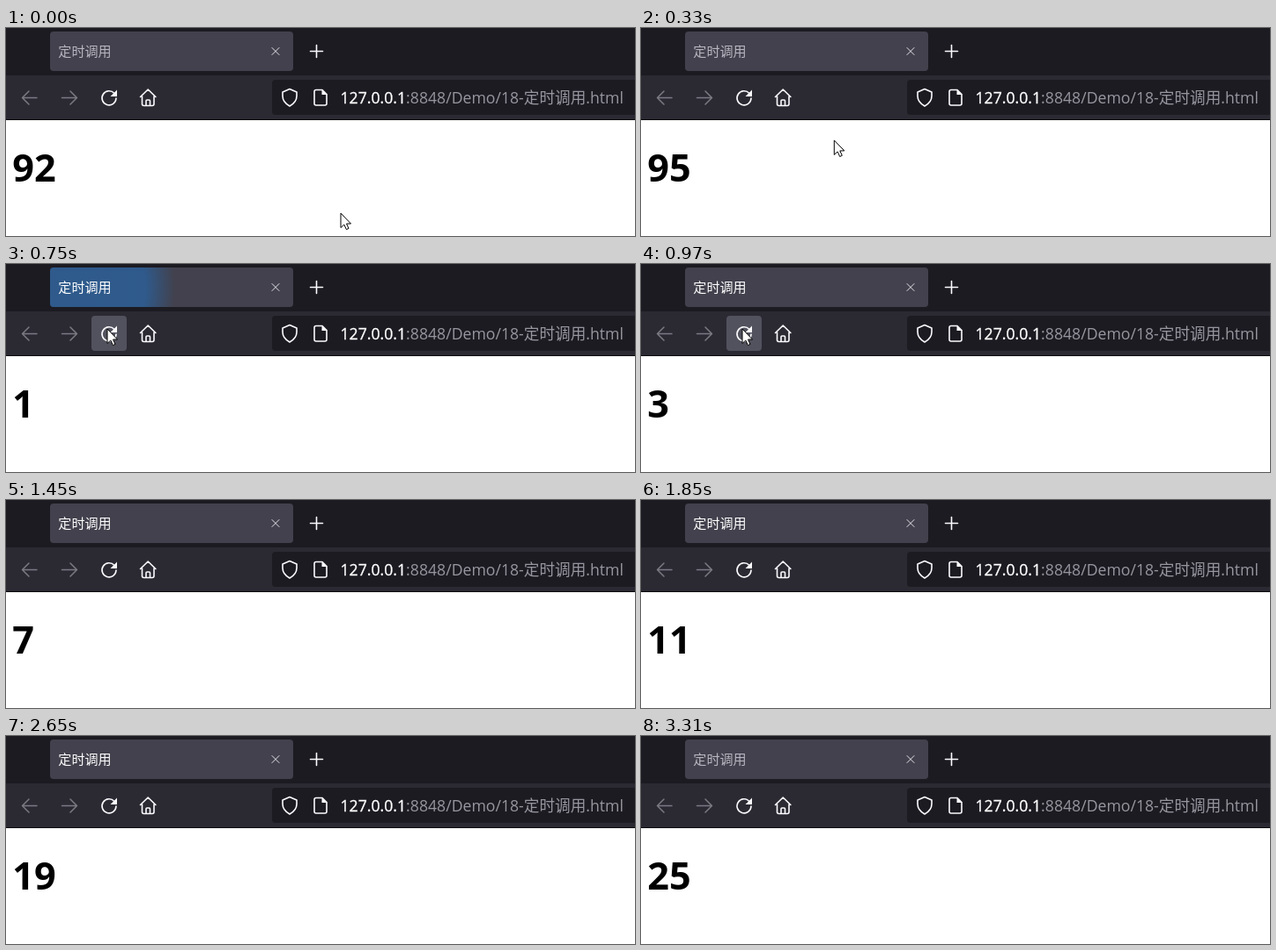
These frames come from a looping animation (714 by 237 pixels, 3.38 s). An HTML page:

```html
<!DOCTYPE html>
<html lang="zh-CN">
<head>
<meta charset="utf-8">
<title>定时调用</title>
<style>
  html, body { margin: 0; width: 100%; height: 100%; overflow: hidden; background: #fff; }
  svg { display: block; }
  text { font-family: "Open Sans", "Noto Sans", "Noto Sans CJK SC", "Noto Sans CJK", sans-serif; }
  .icon { fill: none; stroke: #fbfbfe; stroke-width: 1.6; stroke-linecap: round; stroke-linejoin: round; }
  .dim { stroke: #7b7a83; stroke-width: 1.5; }
  .thin { stroke: #e4e4ea; stroke-width: 1; }
  .solid { fill: #fbfbfe; }
</style>
</head>
<body>
<svg width="714" height="237" viewBox="0 0 714 237">
  <defs>
    <clipPath id="tabClip"><rect x="50" y="4" width="276" height="45" rx="4"/></clipPath>
    <radialGradient id="glow">
      <stop offset=".72" stop-color="#1f6fc0"/>
      <stop offset="1" stop-color="#1f6fc0" stop-opacity="0"/>
    </radialGradient>
  </defs>

  <rect width="714" height="54" fill="#1c1b22"/>
  <rect y="54" width="714" height="50" fill="#2b2a33"/>
  <rect y="104" width="714" height="1" fill="#0c0c0d"/>

  <g clip-path="url(#tabClip)">
    <rect x="50" y="4" width="276" height="45" fill="#42414d"/>
    <circle id="burst" cx="72" cy="27" fill="url(#glow)"/>
  </g>
  <text id="title" x="59.300" y="32.300" font-size="15.1" style="font-family:'Noto Sans CJK SC','Noto Sans CJK',sans-serif">定时调用</text>
  <path class="icon thin" d="M302 22.500l8 8m0-8l-8 8"/>
  <path class="icon" d="M345.500 26.500h14m-7-7v14"/>

  <rect id="hover" y="59" width="40" height="40" rx="4" fill="#52525e"/>
  <path class="icon dim" d="M35 79.500H18.500m7.500-7.500l-7.500 7.500 7.500 7.500"/>
  <path class="icon dim" d="M63.500 79.500h17m-7.500-7.500l7.500 7.500-7.500 7.500"/>
  <path class="icon" d="M123 74.500A8 8 0 1 0 125 80"/>
  <path class="solid" d="M126 70.500v7.500h-7.500z"/>
  <path class="icon" d="M152.500 78.500l8.700-8.500 8.700 8.500M154.500 77.500v9q0 2 2 2h9.500q2 0 2-2V77.500M159 88v-5q0-1 1-1h2.500q1 0 1 1v5"/>

  <rect x="302" y="59" width="425" height="40" rx="4" fill="#1c1b22"/>
  <path class="icon" d="M322 69.500l8 3.500v4.500c0 5.500-3.500 9-8 11.500-4.500-2.500-8-6-8-11.500V73z"/>
  <path class="icon" d="M352 70.500h7l5 5V86q0 2-2 2h-10q-2 0-2-2V72.500q0-2 2-2z"/>
  <path class="solid" d="M358.500 70v6h6z"/>
  <text x="379.500" y="86" font-size="17.65" fill="#97969f"><tspan fill="#fff" stroke="#fff" stroke-width=".3">127.0.0.1</tspan>:8848/Demo/18-定时调用.html</text>

  <text id="count" x="7.300" y="174.800" font-size="43.2" font-weight="700"></text>
  <path id="cursor" d="M0 0V16.500L3.800 13 6.400 18.600 9 17.400 6.500 12H11.500Z" fill="#fff" stroke="#000" stroke-linejoin="round"/>
</svg>
<script>
const LOOP = 3380, RELOAD = 610, LEAVE = 1110;
const BUTTON = [115, 74], START = [380, 211];
const buttonLefts = [97, 142];
const oldTicks = [70, 210, 270, 410, 470];
// Times at which the reloaded page shows 1, 2, 3, ...
const ticks = [610, 900, 970, 1110, 1250, 1310, 1450, 1520, 1650, 1720, 1850, 1920, 2050,
  2180, 2250, 2380, 2450, 2580, 2650, 2780, 2910, 2980, 3110, 3240, 3310];

const el = id => document.getElementById(id);
const [burst, title, hover, count, cursor] = ["burst", "title", "hover", "count", "cursor"].map(el);
const passed = (list, t) => list.filter(at => at <= t).length;
const show = (node, on) => node.setAttribute("visibility", on ? "visible" : "hidden");

function cursorAt(t) {
  if (t < LEAVE) {
    const u = Math.min(1, Math.floor(t / 67.5) / 7);
    const ease = u * u * (3 - 2 * u);
    return START.map((s, i) => s + (BUTTON[i] - s) * ease);
  }
  const step = Math.floor((t - LEAVE) / 68) + 1;
  if (step > 3) return null;
  const u = step / 3;
  return [BUTTON[0] + 72 * u ** 0.85, BUTTON[1] + 69 * u];
}

function hoveredButton(pos) {
  if (!pos || pos[1] < 59 || pos[1] >= 99) return undefined;
  return buttonLefts.find(x => pos[0] >= x && pos[0] < x + 40);
}

function draw(now) {
  const t = now % LOOP;
  count.textContent = t < RELOAD ? 92 + passed(oldTicks, t) : passed(ticks, t);
  title.setAttribute("fill", t < 540 || t >= 3310 ? "#b8b7c0" : "#fff");

  const p = Math.floor((t - RELOAD) / 72) / 5;
  const bursting = p >= 0 && p < 1;
  show(burst, bursting);
  if (bursting) {
    burst.setAttribute("r", 25 + 195 * (1 - (1 - p) ** 3));
    burst.setAttribute("opacity", 0.68 * (1 - p));
  }

  const pos = cursorAt(t);
  show(cursor, pos);
  if (pos) cursor.setAttribute("transform", `translate(${pos})`);
  const left = hoveredButton(pos);
  show(hover, left);
  if (left) hover.setAttribute("x", left);
  requestAnimationFrame(draw);
}
draw(performance.now());
</script>
</body>
</html>
```
